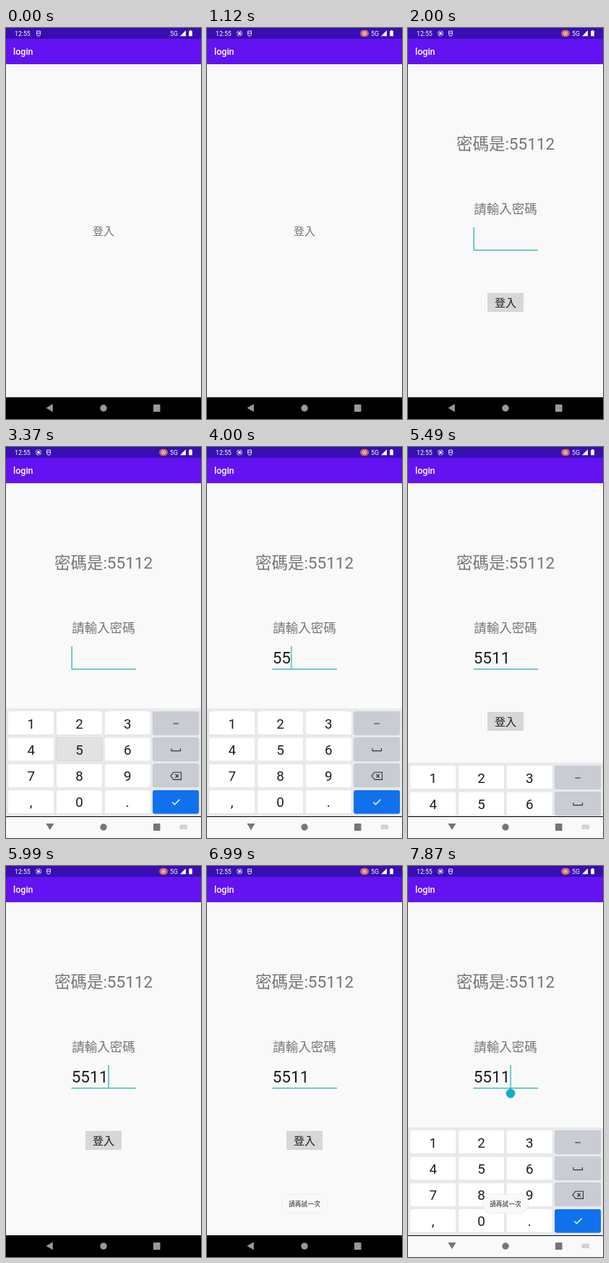
Write an HTML page that moves like this. It is 270 by 540 pixels and loops after 8 s.

```html
<!DOCTYPE html>
<html lang="zh-Hant">
<head>
<meta charset="utf-8">
<title>login</title>
<style>
  html, body { margin: 0; width: 100%; height: 100%; overflow: hidden; background: #f9f9f9; }
  svg { display: block; width: 100%; height: 100%; }
  text { font-family: Roboto, "Noto Sans CJK TC", "Noto Sans CJK JP", "Noto Sans CJK", sans-serif; }
  .mid { text-anchor: middle; }
  .label { fill: #757575; }
  .dark { fill: #1d1d1d; }
  .line { fill: none; stroke: #333; stroke-width: 1.1; }
  .soft { filter: drop-shadow(0 .8px .6px rgba(0, 0, 0, .28)); }
</style>
</head>
<body>
<svg viewBox="0 0 270 540">
  <rect width="270" height="540" fill="#f9f9f9"/>

  <g id="welcome">
    <text class="mid label" x="135" y="285.7" font-size="15">登入</text>
  </g>

  <g id="form">
    <rect y="50" width="270" height="460" fill="#f9f9f9"/>
    <text class="mid label" x="135" y="168" font-size="22.5">密碼是:55112</text>
    <text class="mid label" x="135" y="256" font-size="17.5">請輸入密碼</text>
    <text id="entry" class="dark" x="90.7" y="299" font-size="22.5"><tspan>5</tspan><tspan>5</tspan><tspan>1</tspan><tspan>1</tspan></text>
    <rect x="90.5" y="306.2" width="89.5" height="1.3" fill="#2bb0b4"/>
    <rect id="caret" x="90.5" y="275" width="1.3" height="31" fill="#2bb0b4"/>
    <path id="handle" d="M142 307l4.4 2.6a6.3 6.3 0 1 1-8.8 0z" fill="#0bafca"/>
    <rect id="button" class="soft" x="110" y="366.3" width="50" height="25.5" rx="1.3" fill="#d6d7d7"/>
    <text class="mid dark" x="135" y="384.7" font-size="15">登入</text>
  </g>

  <g id="keyboard">
    <rect y="361" width="270" height="150" fill="#e7eaed"/>
    <g id="keys"></g>
    <path class="line" d="M231.3 382h7.6" stroke-width="1.5"/>
    <path class="line" d="M229 416v3.6h12.5V416"/>
    <path class="line" d="M232 449.2h10.5v10.2H232l-4-5.1zM234.4 452l4.6 4.6m0-4.6l-4.6 4.6"/>
    <path d="M230.3 490.5l3.2 3.2 7-7" fill="none" stroke="#fff" stroke-width="1.4"/>
  </g>

  <rect y="510" width="270" height="30"/>
  <g fill="#999">
    <path d="M55.5 524.8l9.3-5.5v11z"/>
    <circle cx="135" cy="525" r="4.7"/>
    <rect x="204" y="520" width="9.5" height="10" rx=".7"/>
  </g>
  <g id="lightNav" fill="#757575">
    <rect y="511" width="270" height="29" fill="#f9f9f9"/>
    <path d="M55.3 520h11.2l-5.6 9z"/>
    <circle cx="135" cy="525" r="4.7"/>
    <rect x="204" y="520" width="9.5" height="10" rx=".7"/>
    <rect x="240.8" y="521.8" width="10" height="6" rx=".8" fill="#c6c6c6"/>
    <path d="M242 523.6h7.6M242 525.2h7.6M243.7 526.7h4.2" stroke="#f9f9f9" stroke-width=".7" stroke-dasharray="1 .6"/>
  </g>

  <g id="toast">
    <rect class="soft" x="103.5" y="453.3" width="63" height="26.5" rx="13.2" fill="#f9f9f9"/>
    <text class="mid dark" x="135" y="470" font-size="8.75">請再試一次</text>
  </g>

  <rect class="soft" y="15" width="270" height="35" fill="#6313f1"/>
  <rect width="270" height="15" fill="#380eb4"/>
  <text x="10" y="37.2" font-size="12.5" font-weight="500" fill="#fff">login</text>
  <g fill="#fff">
    <text x="12" y="10.8" font-size="8.75">12:55</text>
    <text x="227" y="10.8" font-size="8.75">5G</text>
    <path d="M249 3.3v7.9h-8z"/>
    <path d="M253.2 4h1.4v-.9h1.9V4h1.4v7.2h-4.7z"/>
    <g id="recording">
      <circle cx="45" cy="7.5" r="1.9"/>
      <circle cx="45" cy="7.5" r="3.6" fill="none" stroke="#fff" stroke-width=".9" stroke-dasharray="4.4 1.25"/>
    </g>
    <g id="debug" fill="none" stroke="#fff" stroke-width=".9">
      <path d="M42.6 4.2h4.8v4.6a2.4 2.4 0 0 1-4.8 0zM42.6 7.2h4.8"/>
    </g>
    <g id="chip">
      <rect x="212" y="2.8" width="12.2" height="9.4" rx="4.7" fill="#c0605d"/>
      <circle cx="218" cy="7.5" r="2.9" fill="none" stroke="#fff" stroke-width=".8" stroke-dasharray="3.5 1.05"/>
      <circle cx="218" cy="7.5" r="1.3"/>
    </g>
  </g>
</svg>
<script>
const LOOP = 8000;
const $ = id => document.getElementById(id);

// Holds each value until the next time in the table.
function hold(el, prop, table) {
  const frames = table.map(([time, value]) => ({ offset: time / LOOP, [prop]: value, easing: 'steps(1, end)' }));
  frames.push({ offset: 1, [prop]: table[table.length - 1][1] });
  const animation = el.animate(frames, { duration: LOOP, iterations: Infinity });
  animation.startTime = document.timeline.currentTime;
}
const fade = (el, ...table) => hold(el, 'opacity', table);
const move = (el, ...table) =>
  hold(el, 'transform', table.map(([t, x, y]) => [t, `translate(${x}px, ${y}px)`]));

function make(tag, attrs, parent) {
  const el = document.createElementNS('http://www.w3.org/2000/svg', tag);
  for (const name in attrs) el.setAttribute(name, attrs[name]);
  return parent.appendChild(el);
}

const keys = {};
['123-', '456_', '789<', ',0.>'].forEach((row, r) => [...row].forEach((char, c) => {
  const x = 2.7 + c * 66.8, y = 365 + r * 36.3;
  const fill = char === '>' ? '#1071ec' : c === 3 ? '#c9ccd3' : '#fff';
  keys[char] = make('rect', { x, y, width: 64, height: 32.5, rx: 3, fill, class: 'soft' }, $('keys'));
  if (c < 3) make('text', { x: x + 32, y: y + 23.5, 'font-size': 18.8, class: 'mid dark' }, $('keys')).textContent = char;
}));

fade($('recording'), [0, 0], [120, .4], [250, 1]);
fade($('chip'), [0, 0], [250, .5], [370, 1]);
move($('debug'), [0, 0, 0], [120, 7, 0], [250, 14, 0]);

fade($('welcome'), [0, 1], [1370, 0]);
fade($('form'), [0, 0], [1250, .35], [1370, .8], [1500, 1]);

fade($('keyboard'), [0, 0], [2750, 1], [5500, 0], [7620, 1]);
move($('keyboard'), [0, 0, 150], [2750, 0, 45], [2870, 0, 0], [5370, 0, 75], [5500, 0, 150], [7620, 0, 0]);
fade($('lightNav'), [0, 0], [2750, 1], [5500, 0], [7620, 1]);

const typed = [3500, 3870, 4370, 4750];
const advance = 22.5 * .5615;
[...$('entry').children].forEach((digit, i) => hold(digit, 'fillOpacity', [[0, 0], [typed[i], 1]]));
move($('caret'), [0, 0, 0], ...typed.map((t, i) => [t, (i + 1) * advance + .4, 0]));
fade($('caret'), [0, 1], [3120, 0], [3370, 1], [5240, 0], [5740, 1], [6240, 0], [6740, 1], [6990, 0], [7370, 1]);
fade($('handle'), [0, 0], [7370, 1]);

const press = (el, color, up, ...spans) =>
  hold(el, 'fill', [[0, up], ...spans.flatMap(([from, to]) => [[from, color], [to, up]])]);
press(keys[5], '#e2e2e2', '#fff', [3370, 3620], [3750, 4000]);
press(keys[1], '#e2e2e2', '#fff', [4250, 4500], [4620, 4870]);
press(keys['>'], '#0d60cb', '#1071ec', [5120, 5370]);
press($('button'), '#bfc0c0', '#d6d7d7', [6120, 6370]);

fade($('toast'), [0, 0], [6240, .5], [6370, 1]);
</script>
</body>
</html>
```
